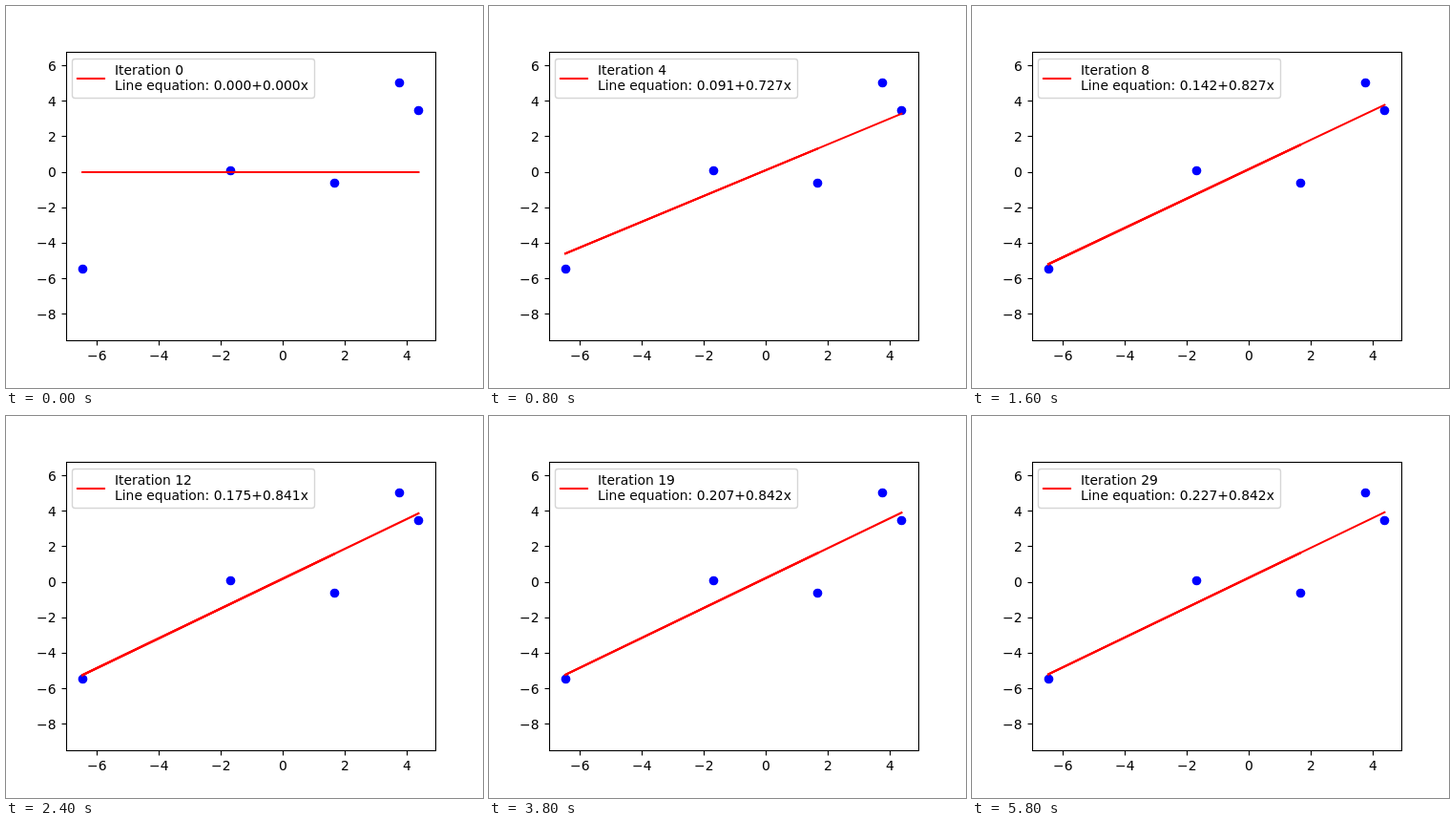
An HTML page with a canvas for the animation above (6000 ms loop, 500 px wide and 400 px high).

```html
<!DOCTYPE html>
<html lang="en">
<head>
<meta charset="utf-8">
<title>Line fit by gradient descent</title>
<style>
  html, body { margin: 0; width: 100%; height: 100%; overflow: hidden; background: #fff; }
  canvas { display: block; width: 500px; height: 400px; }
</style>
</head>
<body>
<canvas id="plot" width="500" height="400"></canvas>
<script>
const ctx = document.getElementById('plot').getContext('2d');
const STEP = 200, COUNT = 30;
const FONT = '13.89px "DejaVu Sans", sans-serif';
const LINE = 2.08, THIN = 1.11;
const box = { left: 63.5, right: 450.5, top: 48.5, bottom: 350.5 };

const points = [[-6.46, -5.46], [-1.69, 0.08], [1.66, -0.61], [3.76, 5.04], [4.38, 3.47]];
const px = x => 290.1 + x * 32.5;
const py = y => 173.6 - y * 18.585;
const snap = v => Math.round(v) + 0.5;

// Gradient descent from a flat line towards the least-squares fit.
const fit = { a: 0.2375, b: 0.8416 };
const meanX = 0.332, meanXX = 16.103, rate = 0.1;
const lines = [{ a: 0, b: 0 }];
while (lines.length < COUNT) {
  const { a, b } = lines[lines.length - 1];
  const da = fit.a - a, db = fit.b - b;
  lines.push({
    a: a + rate * (da + meanX * db),
    b: b + rate * (meanX * da + meanXX * db)
  });
}

function stroke(x1, y1, x2, y2) {
  ctx.beginPath();
  ctx.moveTo(x1, y1);
  ctx.lineTo(x2, y2);
  ctx.stroke();
}

// align: 0 = left, 0.5 = centre, 1 = right; the left edge sits on a whole pixel.
function text(str, x, y, align = 0) {
  const width = ctx.measureText(str).width;
  ctx.fillText(str, Math.round(x - width * align), Math.round(y));
}

const label = n => String(n).replace('-', '\u2212');

function drawAxes() {
  ctx.strokeStyle = ctx.fillStyle = '#000';
  ctx.lineWidth = THIN;
  ctx.lineCap = 'butt';
  for (let v = -6; v <= 4; v += 2) {
    const x = snap(px(v));
    stroke(x, box.bottom, x, box.bottom + 5);
    text(label(v), px(v), 371, 0.5);
  }
  for (let v = -8; v <= 6; v += 2) {
    const y = snap(py(v));
    stroke(box.left - 5, y, box.left, y);
    text(label(v), 52.8, py(v) + 5.5, 1);
  }
  ctx.strokeRect(box.left, box.top, box.right - box.left, box.bottom - box.top);
}

function drawPoints() {
  ctx.fillStyle = '#00f';
  for (const [x, y] of points) {
    ctx.beginPath();
    ctx.arc(snap(px(x)), snap(py(y)), 4.86, 0, Math.PI * 2);
    ctx.fill();
  }
}

function drawLine({ a, b }) {
  const flat = b === 0;
  const yAt = x => flat ? Math.round(py(a)) : py(a + b * x);
  const segment = (x1, x2) => stroke(px(x1), yAt(x1), px(x2), yAt(x2));
  const first = points[0][0], middle = points[2][0], last = points[4][0];
  ctx.strokeStyle = '#f00';
  ctx.lineWidth = LINE;
  ctx.lineCap = 'square';
  segment(first, last);
  // The path runs back over its left part, which hardens the edges there.
  if (!flat) {
    segment(first, middle);
    segment(first, middle);
  }
}

function drawLegend(n, { a, b }) {
  ctx.beginPath();
  ctx.roundRect(69.5, 55.5, 254, 41, 2.8);
  ctx.fillStyle = 'rgba(255,255,255,0.8)';
  ctx.fill();
  ctx.strokeStyle = 'rgba(204,204,204,0.8)';
  ctx.lineWidth = 1.39;
  ctx.stroke();
  ctx.strokeStyle = '#f00';
  ctx.lineWidth = LINE;
  ctx.lineCap = 'square';
  stroke(75, 76, 103, 76);
  ctx.fillStyle = '#000';
  text('Iteration ' + n, 114, 72);
  text('Line equation: ' + a.toFixed(3) + '+' + b.toFixed(3) + 'x', 114, 88);
}

function draw(n) {
  ctx.fillStyle = '#fff';
  ctx.fillRect(0, 0, 500, 400);
  ctx.font = FONT;
  drawPoints();
  drawLine(lines[n]);
  drawAxes();
  drawLegend(n, lines[n]);
}

const start = performance.now();
function tick() {
  const t = Math.max(0, performance.now() - start);
  draw(Math.floor(t / STEP) % COUNT);
  requestAnimationFrame(tick);
}
tick();
</script>
</body>
</html>
```
